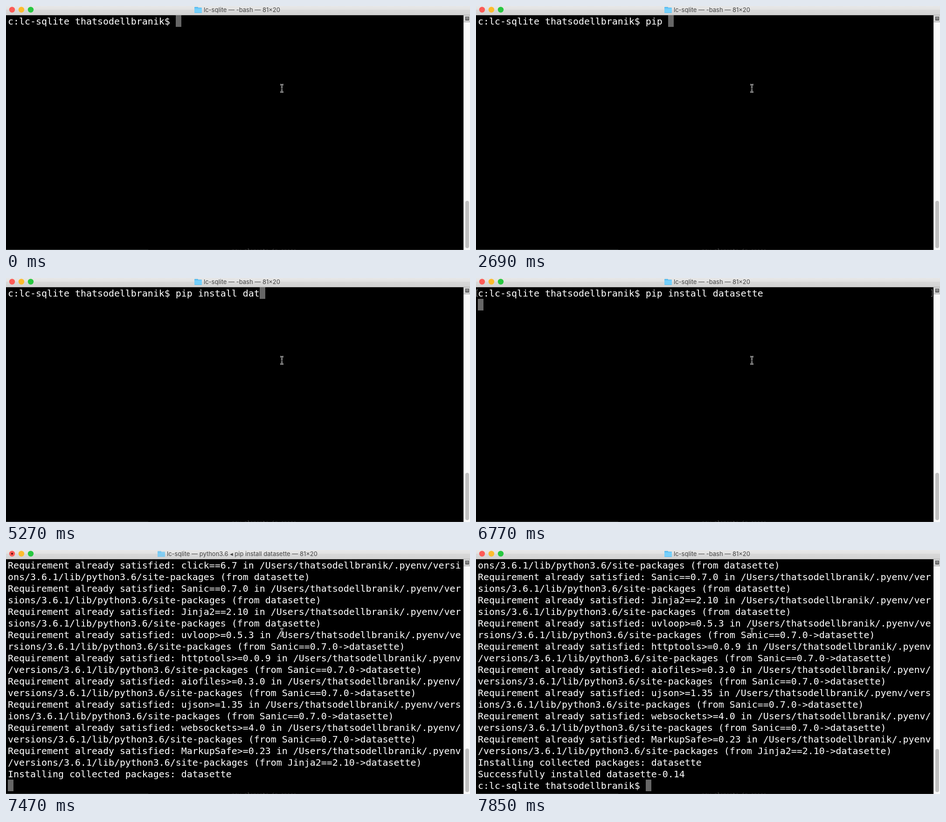
An HTML page with a canvas for the animation above (8 s loop, 995 by 526 pixels).

```html
<!DOCTYPE html>
<html lang="en">
<head>
<meta charset="utf-8">
<title>Terminal</title>
<style>
  html, body { margin: 0; width: 100%; height: 100%; overflow: hidden; background: #000; }
  canvas { display: block; }
</style>
</head>
<body>
<canvas id="stage" width="995" height="526"></canvas>
<script>
const ctx = document.getElementById('stage').getContext('2d');
const LOOP = 8000, COLS = 81, ROWS = 20, CELL = 12, LINE = 25, LEFT = 4, TOP = 20;
const MONO = '19.93px "DejaVu Sans Mono", "Noto Sans Mono", monospace';
const USER = 'thatsodellbranik';
const PROMPT = `c:lc-sqlite ${USER}$ `;
const COMMAND = 'pip install datasette';

// [time, typed text]; plain keystrokes extend the command by one or two letters
const keys = [[0, ''], [990, 'p'], [1260, 'pi'], [1800, 'pip'], [1880, 'pip '], [2150, 'pip u'], [2690, 'pip ']];
[2950, 3220, 3310, 3490, 3670, 3750, 4020, 4380, 4640, 5270, 5450, 5710, 5890, 6060, 6240, 6320]
  .reduce((n, t) => {
    n += t === 3490 ? 2 : 1;
    keys.push([t, COMMAND.slice(0, n)]);
    return n;
  }, 4);

const ENTER = 6770, RUN = 6850, BUSY = 6940, COLLECT = 7380, LIST = 7470, DONE = 7560, READY = 7760, IDLE = 7850;

const requirement = (pkg, parent = 'Sanic==0.7.0->datasette') =>
  `Requirement already satisfied: ${pkg} in /Users/${USER}/.pyenv/versions/3.6.1/lib/python3.6/site-packages (from ${parent})`;

const output = [
  [COLLECT, 'Collecting datasette'],
  [COLLECT, '  Using cached datasette-0.14-py3-none-any.whl'],
  ...['click==6.7', 'Sanic==0.7.0', 'Jinja2==2.10'].map(p => [LIST, requirement(p, 'datasette')]),
  ...['uvloop>=0.5.3', 'httptools>=0.0.9', 'aiofiles>=0.3.0', 'ujson>=1.35', 'websockets>=4.0']
    .map(p => [LIST, requirement(p)]),
  [LIST, requirement('MarkupSafe>=0.23', 'Jinja2==2.10->datasette')],
  [LIST, 'Installing collected packages: datasette'],
  [DONE, 'Successfully installed datasette-0.14']
];

function rect(x, y, w, h, color) {
  ctx.fillStyle = color;
  ctx.fillRect(x, y, w, h);
}

function disc(x, y, r, color) {
  ctx.fillStyle = color;
  ctx.beginPath();
  ctx.arc(x, y, r, 0, Math.PI * 2);
  ctx.fill();
}

function pill(x, y, w, h, r, color) {
  ctx.fillStyle = color;
  ctx.beginPath();
  ctx.roundRect(x, y, w, h, r);
  ctx.fill();
}

function label(text, x, y, font, color) {
  ctx.font = font;
  ctx.fillStyle = color;
  ctx.fillText(text, x, y);
}

const wrap = text => text.match(new RegExp(`.{1,${COLS}}`, 'g')) || [''];

function screenLines(t) {
  const typed = keys.filter(k => k[0] <= t).pop()[1];
  const lines = wrap(PROMPT + typed);
  if (t >= ENTER) {
    for (const [at, text] of output) if (t >= at) lines.push(...wrap(text));
    lines.push(t >= READY ? PROMPT : '');
  }
  return lines;
}

function drawBrackets() {
  for (const [x, foot] of [[1, 1], [978, 976]]) {
    rect(x, 25, 1, 15, '#8c8c8c');
    rect(foot, 25, 3, 1, '#8c8c8c');
    rect(foot, 39, 3, 1, '#8c8c8c');
  }
}

function drawText(t) {
  const lines = screenLines(t), view = lines.slice(-ROWS);
  const last = view.length - 1;
  rect(LEFT + view[last].length * CELL, TOP + last * LINE, CELL, LINE, '#666');
  view.forEach((s, i) => label(s, LEFT, TOP + 20 + i * LINE, MONO, '#fff'));
  if (t >= ENTER && lines.length <= ROWS) drawBrackets();
}

function drawFolder(x, soft) {
  ctx.globalAlpha = soft ? 0.55 : 1;
  pill(x, 2, 8, 5, 1, '#5bbdf0');
  pill(x, 3.5, 16, 11.5, 1, '#5bbdf0');
  rect(x, 5, 16, 9, '#76d0fb');
  ctx.globalAlpha = 1;
}

function drawTitleBar(t) {
  const running = t >= RUN && t < IDLE, busy = t >= BUSY && t < IDLE;
  const shade = ctx.createLinearGradient(0, 0, 0, 19);
  shade.addColorStop(0, '#e7e7e7');
  shade.addColorStop(0.42, '#e2e2e2');
  shade.addColorStop(0.43, '#d9d9d9');
  shade.addColorStop(1, '#d3d3d3');
  rect(0, 0, 995, 19, shade);
  rect(0, 19, 995, 1, '#aeaeae');
  ['#fc5b57', '#fdbc2e', '#28c840'].forEach((c, i) => disc(13 + 20 * i, 8, 6.2, c));
  if (busy) disc(13, 8, 2, '#5a0a08');
  const x = running ? 325 : 404;
  drawFolder(x, running);
  const title = running ? 'python3.6 ◂ pip install datasette' : '-bash';
  label(`lc-sqlite — ${title} — 81×20`, x + 20, 13,
    '13px Inter, "Liberation Sans", sans-serif', '#444');
}

function drawScrollbar(t) {
  rect(981, 20, 14, 506, '#fafafa');
  rect(981, 20, 1, 506, '#e4e4e4');
  rect(981, 20, 14, 15, '#d4d4d4');
  rect(981, 34, 14, 1, '#a8a8a8');
  rect(985, 23, 8, 8, '#444');
  for (const y of [24, 26, 28]) rect(986, y, 6, 1, '#ccc');
  const y = t >= DONE ? 429 : t >= LIST ? 428 : 420;
  pill(985, y, 8, 522 - y, 4, '#c1c1c1');
}

function drawPointer() {
  const beam = new Path2D('M588 169.5Q591.5 169.5 591.5 172V183Q591.5 185.5 588 185.5M595 169.5Q591.5 169.5 591.5 172M591.5 183Q591.5 185.5 595 185.5M590 178.5H593');
  for (const [width, color] of [[2.8, '#d8d8d8'], [1, '#000']]) {
    ctx.lineWidth = width;
    ctx.strokeStyle = color;
    ctx.stroke(beam);
  }
}

function drawBottomEdge() {
  rect(0, 525, 305, 1, '#454b4b');
  rect(305, 525, 676, 1, '#282828');
  label('new elements in space', 484, 531, '11px "Noto Sans Mono", monospace', '#555');
}

function draw(t) {
  rect(0, 0, 995, 526, '#000');
  drawBottomEdge();
  drawText(t);
  drawTitleBar(t);
  drawScrollbar(t);
  drawPointer();
}

const start = performance.now();
function tick() {
  draw((performance.now() - start) % LOOP);
  requestAnimationFrame(tick);
}
tick();
</script>
</body>
</html>
```
